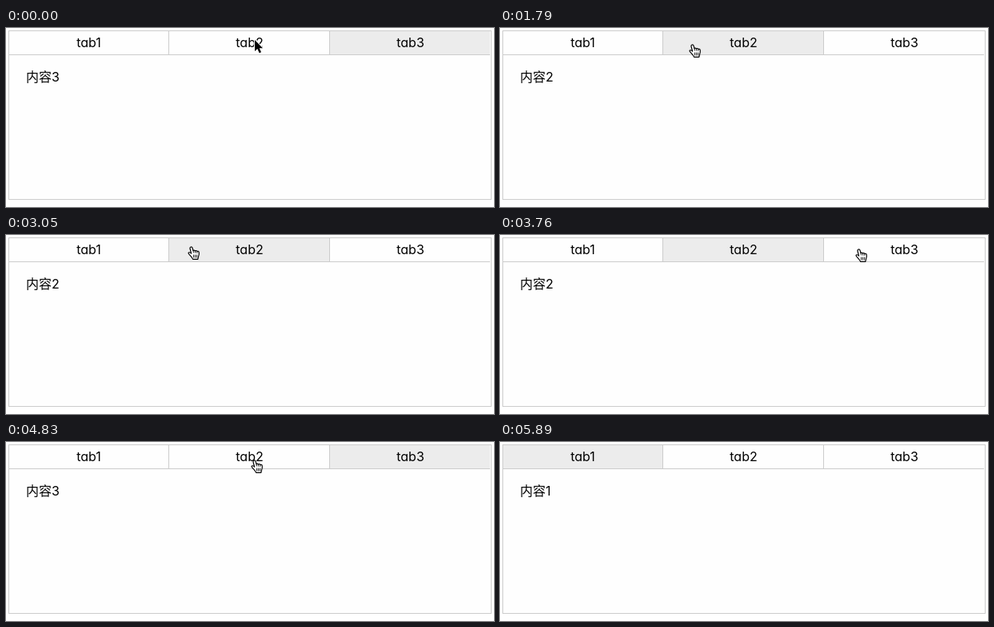
An HTML page for the animation above (6.27 s loop, 610x224 px).

```html
<!DOCTYPE html>
<html lang="zh">
<head>
<meta charset="utf-8">
<title>Tabs</title>
<style>
  html, body { margin: 0; width: 100%; height: 100%; overflow: hidden; background: #fff; }
  svg { display: block; width: 610px; height: 224px; }
  text { font: 16px Inter, "Noto Sans CJK SC", "Noto Sans CJK", sans-serif; font-feature-settings: "cv11"; }
  .tabs { text-anchor: middle; }
  .frame { fill: none; stroke: #ccc; shape-rendering: crispEdges; }

  /* every change is a hard step */
  .active, .page, .hand, .arrow { animation: 6270ms step-end infinite; }
  .active { fill: #ececec; animation-name: select; }
  .one { animation-name: page1; }
  .two { animation-name: page2; }
  .three { animation-name: page3; }
  .hand { animation-name: point; }
  .arrow { animation-name: arrow; }

  @keyframes select {
    0%, 65.55%, 100% { transform: translate(405px, 4px); }
    17.22%, 48.64%, 79.9% { transform: translate(204px, 4px); }
    34.29%, 88.35% { transform: translate(4px, 4px); }
  }
  @keyframes page1 {
    0%, 48.64%, 100% { opacity: 0; }
    34.29%, 88.35% { opacity: 1; }
  }
  @keyframes page2 {
    0%, 34.29%, 65.55%, 88.35%, 100% { opacity: 0; }
    17.22%, 48.64%, 79.9% { opacity: 1; }
  }
  @keyframes page3 {
    0%, 65.55%, 100% { opacity: 1; }
    17.22%, 79.9% { opacity: 0; }
  }
  @keyframes point {
    0% { transform: translate(307px, 16px); opacity: 0; }
    14.35% { transform: translate(307px, 16px); opacity: 1; }
    22.96% { transform: translate(288px, 17px); opacity: 1; }
    25.83% { transform: translate(236px, 20px); opacity: 1; }
    28.7% { transform: translate(170px, 24px); opacity: 1; }
    31.41% { transform: translate(129px, 27px); opacity: 1; }
    40.03% { transform: translate(141px, 24px); opacity: 1; }
    42.9% { transform: translate(186px, 18px); opacity: 1; }
    45.77% { transform: translate(227px, 14px); opacity: 1; }
    51.51% { transform: translate(318px, 10px); opacity: 1; }
    54.38% { transform: translate(420px, 8px); opacity: 1; }
    57.09% { transform: translate(438px, 13px); opacity: 1; }
    59.96% { transform: translate(444px, 17px); opacity: 1; }
    68.42% { transform: translate(396px, 21px); opacity: 1; }
    71.29% { transform: translate(343px, 24px); opacity: 1; }
    77.03% { transform: translate(306px, 22px); opacity: 1; }
    82.77% { transform: translate(212px, 20px); opacity: 1; }
    85.48% { transform: translate(146px, 21px); opacity: 1; }
    91.22%, 100% { transform: translate(146px, 21px); opacity: 0; }
  }
  @keyframes arrow {
    0% { transform: translate(310px, 14px); opacity: 1; }
    14.35% { transform: translate(310px, 14px); opacity: 0; }
    91.22% { transform: translate(525px, 193px); opacity: 1; }
    93.93%, 100% { transform: translate(525px, 193px); opacity: 0; }
  }
</style>
</head>
<body>
<svg viewBox="0 0 610 224">
  <rect x="4" y="4" width="602" height="210" fill="#fefefe"/>
  <rect class="active" width="200" height="29"/>
  <path class="frame" d="M3.5 3.5H606.5V214.5H3.5ZM3 33.5H605M203.5 4V33M404.5 4V33"/>

  <g class="tabs">
    <text x="103.5" y="24">tab1</text>
    <text x="304.5" y="24">tab2</text>
    <text x="505.5" y="24">tab3</text>
  </g>

  <text class="page one" x="25" y="67">内容1</text>
  <text class="page two" x="25" y="67">内容2</text>
  <text class="page three" x="25" y="67">内容3</text>

  <g class="hand" stroke="#000" stroke-linejoin="round" stroke-linecap="round">
    <path fill="#fff" stroke-width="1.2" d="M3.6 1.2C4.6.6 5.6 1 6 2.2L7 5.6C7.4 4.8 9 4.8 9.4 6C9.9 5.2 11.5 5.4 11.8 6.5C12.6 6 14 6.4 14.2 7.6C14.6 9.5 14.4 11.2 13.6 12.8L12.8 16.4H6.6C6 14.5 4.4 13 3.2 11.6C2.2 10.4 1 9.6 1 8.6C1.2 7.4 2.8 7.4 4.6 9.2L3 3C2.8 2 3 1.5 3.6 1.2Z"/>
    <path fill="none" stroke-width=".9" d="M7 5.6L7.5 8M9.4 6L9.7 8.2M11.8 6.5V8.4M7.6 11V14M9.6 11V14M11.6 11V14"/>
  </g>
  <path class="arrow" stroke="#fff" stroke-width="1.8" paint-order="stroke" d="M1 1V15L4.3 12L6.6 17.3L9 16.3L6.7 11.2H11Z"/>
</svg>
</body>
</html>
```
